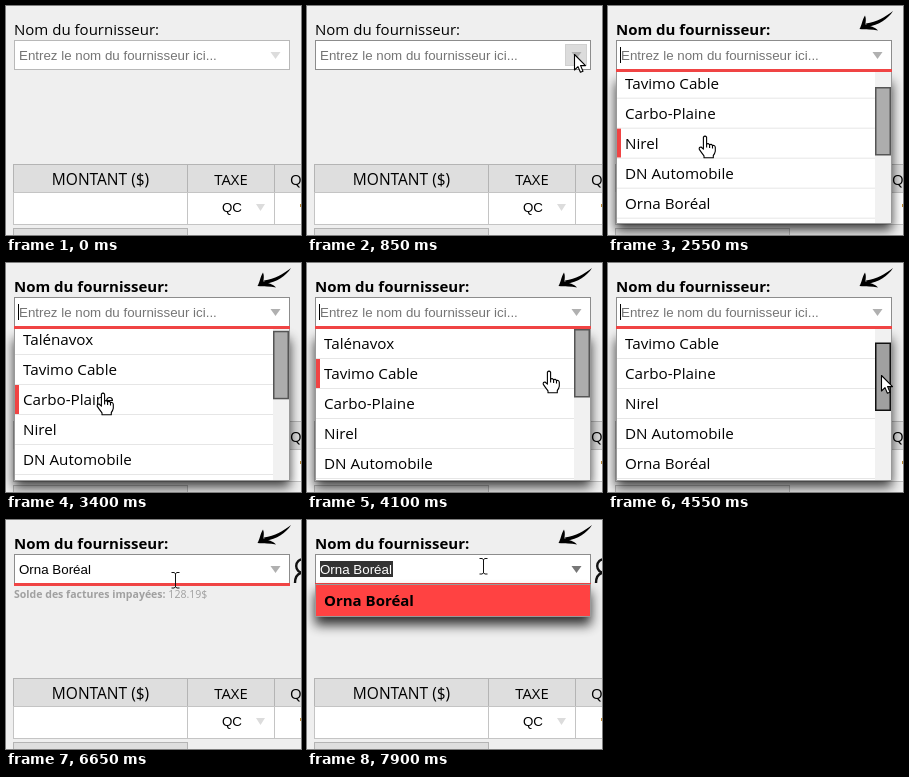
Animation, 295 px wide and 229 px high, one loop 8000 ms. Source, as an HTML page:

```html
<!DOCTYPE html>
<html lang="fr">
<head>
<meta charset="utf-8">
<title>Choix du fournisseur</title>
<style>
  html, body { margin: 0; width: 100%; height: 100%; overflow: hidden; background: #efefef; }
  svg { display: block; width: 295px; height: 229px; }
  text { font: 15px "Open Sans", "Noto Sans", sans-serif; fill: #000; white-space: pre; }
  .bold { font-weight: 700; }
  .input { font: 13.333px "Liberation Sans", Arial, sans-serif; }
  .row { font-size: 15.2px; }
  .note { font-size: 10.56px; fill: #a0a0a0; }
  .head { fill: #dedede; stroke: #b4b4b4; }
  .cell { fill: #fff; stroke: #c4c4c4; }
  .cursor { fill: #fff; stroke: #000; stroke-width: 1.1; stroke-linejoin: round; }
</style>
</head>
<body>
<svg viewBox="0 0 295 229" xmlns="http://www.w3.org/2000/svg">
  <defs>
    <clipPath id="view"><rect x="8" y="66" width="276" height="151"/></clipPath>
    <filter id="blur" x="-20%" y="-60%" width="140%" height="240%"><feGaussianBlur stdDeviation="6"/></filter>
  </defs>
  <rect width="295" height="229" fill="#efefef"/>

  <g id="table">
    <rect class="head" x="7.5" y="158.5" width="174" height="28"/>
    <rect class="head" x="181.5" y="158.5" width="87" height="28"/>
    <rect class="head" x="268.5" y="158.5" width="60" height="28"/>
    <rect class="cell" x="7.5" y="186.5" width="174" height="32"/>
    <rect class="cell" x="181.5" y="186.5" width="87" height="32"/>
    <rect class="cell" x="268.5" y="186.5" width="60" height="32"/>
    <rect class="head" x="7.5" y="222.5" width="174" height="28"/>
    <text x="94.5" y="179" text-anchor="middle" style="font-size:15.5px">MONTANT ($)</text>
    <text x="225" y="179" text-anchor="middle" style="font-size:14.8px">TAXE</text>
    <text x="284" y="179">Q</text>
    <text class="input" x="216" y="206">QC</text>
    <path d="M250 198h9l-4.5 7z" fill="#dcdcdc"/>
    <rect x="294" y="198" width="1" height="3" fill="#c08a30"/>
  </g>

  <text id="label" x="8" y="29">Nom du fournisseur:</text>
  <g id="arrow">
    <path d="M285 5C280 13 271 19 259 21L258 17.5C269 16 277 11 285 5Z"/>
    <path d="M257 9.5C258.5 13 257.5 16 257.5 18.5C262 20 267 21 270 24.5C264 23 258 24 251.5 23C254 19 254 14 257 9.5Z"/>
  </g>
  <g id="person" fill="none" stroke="#111" stroke-width="2.4">
    <circle cx="297" cy="46" r="6.8"/>
    <path d="M289 63Q289 55 295 53"/>
  </g>

  <rect id="field" x="8.5" y="34.5" width="275" height="29" fill="#fff"/>
  <rect id="button" x="258.5" y="38.5" width="21" height="21" fill="#dcdcdc" stroke="#d0d0d0"/>
  <path id="chevron" d="M264.5 46h10l-5 7z"/>
  <rect id="mark" x="13" y="41" width="73" height="16" fill="#333"/>
  <text id="value" class="input" x="13" y="54"></text>
  <rect id="caret" x="12" y="41" width="1" height="16"/>
  <rect id="line" x="8" y="63" width="276" height="3" fill="#f04444"/>
  <text id="note" class="note" x="8" y="78"><tspan class="bold">Solde des factures impayées:</tspan> 128.19$</text>

  <g id="list">
    <rect x="8" y="76" width="276" height="148" fill="#000" opacity=".75" filter="url(#blur)"/>
    <rect x="8" y="66" width="276" height="151.5" fill="#fff"/>
    <g clip-path="url(#view)">
      <g id="rows"></g>
      <rect x="267" y="66" width="16" height="151" fill="#f1f1f1"/>
      <rect id="thumb" x="267.75" y="66.75" width="14.5" height="67" stroke-width="1.5"/>
    </g>
    <path d="M8.5 66V217.5H283.5V66" fill="none" stroke="#999"/>
    <rect x="8" y="63" width="276" height="3" fill="#f04444"/>
  </g>

  <g id="match">
    <rect x="8" y="72" width="276" height="33" fill="#000" opacity=".8" filter="url(#blur)"/>
    <rect x="8.5" y="64.5" width="275" height="32" fill="#ff4242" stroke="#999"/>
    <text class="bold" x="17" y="86"></text>
  </g>

  <g id="pointer" class="cursor"><path d="M.5 .5V16L4 12.6L6.4 18.3L9 17.2L6.6 11.6H11.5Z"/></g>
  <g id="hand" class="cursor">
    <path d="M-1.6 1.2Q0-.9 1.6 1.2V8.2Q3.2 6.8 4.6 8.8Q6.3 7.6 7.5 9.6Q9.8 8.8 10.3 11.3V15.2Q9.8 18 8.3 19.5V21.8H-1V19.8Q-3.6 16.6-5.7 13.4Q-6.3 10.9-3.9 11L-1.6 13.2Z"/>
    <path d="M1.6 8V11.5M4.6 9V12M7.5 10V12.5" fill="none"/>
  </g>
  <g id="beam" fill="none" stroke="#111"><path d="M-3.5-7.5H-1L.5-6.5L2-7.5H4.5M.5-6.5V7M-3.5 8H-1L.5 7L2 8H4.5"/></g>
</svg>

<script>
const LOOP = 8000, STEP = 50, ROW = 30, TOP = 66;
const CHOICE = "Orna Boréal";
const NAMES = ["Talénavox", "Tavimo Cable", "Carbo-Plaine", "Nirel", "DN Automobile", CHOICE, "Jérôme Lavoix"];

// time, x, y
const PATH = [
  [200, 289, 200], [850, 267, 48], [1450, 267, 48], [1650, 206, 85], [2250, 97, 130],
  [3750, 97, 130], [4200, 284, 102], [4400, 273, 98], [4550, 273, 112], [4800, 273, 125],
  [4850, 262, 127], [5200, 116, 153], [5400, 72, 167], [6000, 72, 166], [6650, 169, 60],
  [6750, 266, 55], [6800, 260, 54], [6850, 221, 54], [7450, 221, 54], [7900, 176, 46]
];
// time, list offset
const SCROLL = [[2300, 0], [2750, 60], [2900, 60], [3400, 4], [3550, 0], [4400, 0], [4550, 30], [4800, 60]];

const $ = id => document.getElementById(id);
const show = (id, on) => { $(id).style.display = on ? "" : "none"; };
const set = (id, attrs) => { for (const k in attrs) $(id).setAttribute(k, attrs[k]); };

function at(keys, t) {
  if (t <= keys[0][0]) return keys[0].slice(1);
  for (let i = 1; i < keys.length; i++) {
    const a = keys[i - 1], b = keys[i];
    if (t <= b[0]) {
      const k = (t - a[0]) / (b[0] - a[0]);
      return a.slice(1).map((v, n) => v + (b[n + 1] - v) * k);
    }
  }
  return keys[keys.length - 1].slice(1);
}

$("rows").innerHTML = NAMES.map((name, i) => {
  const y = TOP + i * ROW;
  return `<rect class="bar" x="9" y="${y}" width="4" height="29" fill="#f04444"/>` +
    `<text class="row" x="17" y="${y + 20}">${name}</text>` +
    `<rect x="9" y="${y + 29}" width="258" height="1" fill="#e6e6e6"/>`;
}).join("");
const bars = [...document.querySelectorAll(".bar")];
document.querySelector("#match text").textContent = CHOICE;

function draw(t) {
  const [x, y] = at(PATH, t), [offset] = at(SCROLL, t);
  const focus = t >= 1050, open = focus && t < 5750, chosen = t >= 5750;
  const marked = t >= 7000, matching = t >= 7450;
  const overField = x > 8 && x < 284 && y > 34 && y < 66;
  const overButton = overField && x >= 258;
  const overList = open && x > 8 && x < 267 && y >= TOP && y < 217;
  const onThumb = open && t >= 4350 && t < 4850;

  $("label").classList.toggle("bold", focus);
  show("arrow", focus);
  show("person", chosen);
  show("line", focus);
  show("note", chosen && !matching);
  set("field", { stroke: focus || (t >= 200 && overField) ? "#8c8c8c" : "#b8b8b8" });
  show("button", t >= 200 && t < 1700 && (overButton || t >= 1450));
  set("chevron", { fill: marked ? "#777" : focus || (t >= 200 && overButton) ? "#b0b0b0" : "#dcdcdc" });

  show("mark", marked);
  show("caret", open);
  $("value").textContent = chosen ? CHOICE : "Entrez le nom du fournisseur ici...";
  $("value").style.fill = marked ? "#fff" : chosen ? "#000" : "#757575";

  show("list", open);
  $("list").style.opacity = t < 1150 ? 0.5 : 1;
  set("rows", { transform: `translate(0 ${-offset})` });
  const hover = overList ? Math.floor((y - TOP + offset) / ROW) : -1;
  bars.forEach((bar, i) => { bar.style.display = i === hover ? "" : "none"; });
  set("thumb", { y: TOP + 0.75 + offset * 0.45, fill: onThumb ? "#a0a0a0" : "#adadad", stroke: onThumb ? "#111" : "#555" });
  show("match", matching);

  const kind = overList ? "hand" : overField && !overButton ? "beam" : "pointer";
  const press = t >= 5600 && t < 5750 ? 1 : 0;
  for (const id of ["pointer", "hand", "beam"]) show(id, t >= 200 && id === kind);
  set(kind, { transform: `translate(${Math.round(x)} ${Math.round(y) + press})` });
}

const start = performance.now();
function tick() {
  const t = (performance.now() - start) % LOOP;
  draw(Math.floor(t / STEP) * STEP);
  requestAnimationFrame(tick);
}
tick();
</script>
</body>
</html>
```
